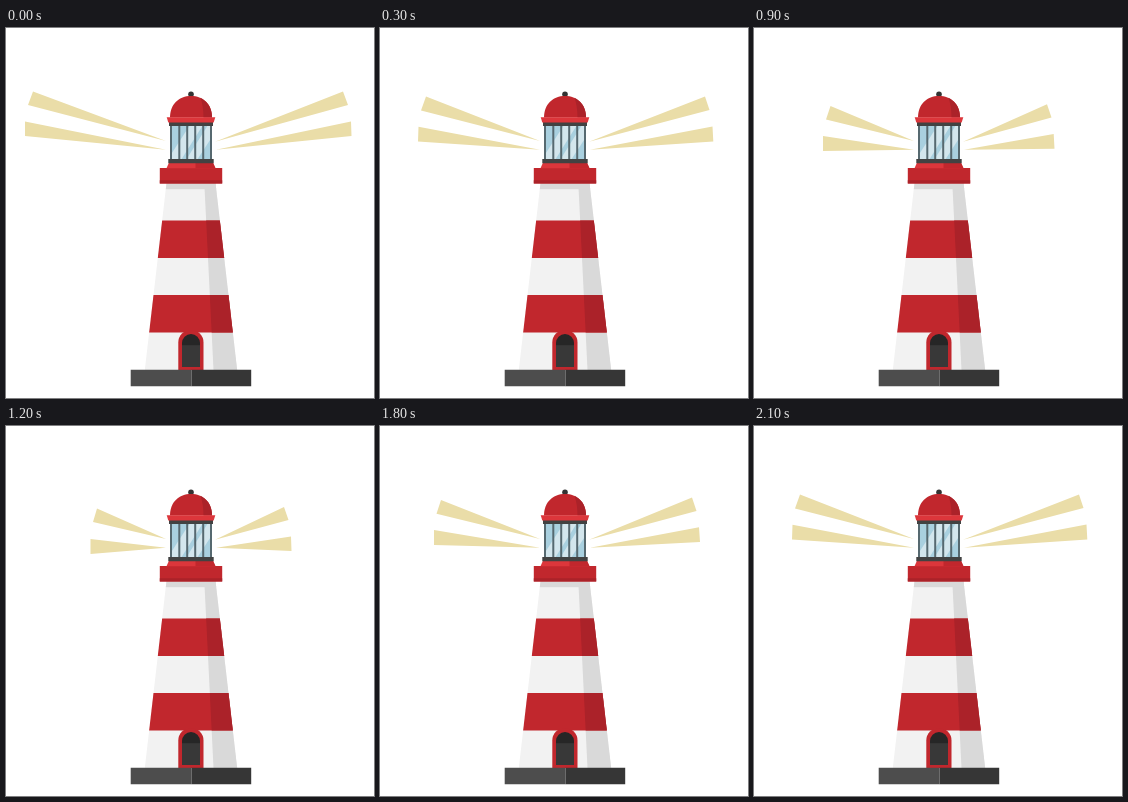
Write an HTML page that moves like this. It is 368x370 px and loops after 2.4 s.

```html
<!DOCTYPE html>
<html lang="en">
<head>
<meta charset="utf-8">
<title>Lighthouse</title>
<style>
  html, body { margin: 0; width: 100%; height: 100%; overflow: hidden; background: #fff; }
  svg { display: block; width: 368px; height: 370px; }

  .beams { fill: #eadda8; animation: sweep 2.4s step-end infinite; }

  /* Four wedges with fixed tips; the outer ends draw in and back out. */
  @keyframes sweep {
    0%, 100% { d: path("M160 113L27 63.5L22 77ZM160 121.7L19 93.5V108ZM209 113.7L337 63.5L342 77ZM210 121.7L345 93.5L345.5 108Z"); }
    12.5%, 87.5% { d: path("M160 113L46 68.5L41 82.5ZM160 121.7L38.5 98.7L38 113.5ZM209 113.7L325 68.5L329.5 82ZM210 121.7L332.5 98.5L333.3 113.5Z"); }
    25%, 75% { d: path("M160 113L61 74L56.5 87.7ZM160 121.7L54 104V119ZM209 113.7L312 71.5L316.5 85ZM210 121.7L319 101.3L320 116Z"); }
    37.5%, 62.5% { d: path("M160 113L76.5 78L72 91.5ZM160 121.7L69 108V123ZM209 113.7L293 76.3L297.5 89.5ZM210 121.7L299.7 106L300.5 120.7Z"); }
    50% { d: path("M160 113L91 82.5L87 96ZM160 121.7L84.5 113V128ZM209 113.7L278 81L282.5 94ZM210 121.7L285 110.5L285.5 125Z"); }
  }
</style>
</head>
<body>
<svg viewBox="0 0 368 370">
  <defs>
    <clipPath id="tower"><path d="M160.5 155H209.5L231.2 342H138.8Z"/></clipPath>
    <clipPath id="glass"><path d="M164 97H206V132H164Z"/></clipPath>
    <clipPath id="dome"><path d="M164 89.5C164 76 173 68 185 68S206 76 206 89.5Z"/></clipPath>
    <clipPath id="door"><path d="M176 339V315A9 9 0 0 1 194 315V339Z"/></clipPath>
    <path id="shade" d="M198.3 155H235V342H207.5Z"/>
    <path id="stripes" d="M130 192.5H240V230H130ZM130 267H240V304.5H130Z"/>
    <clipPath id="shaded"><use href="#shade"/></clipPath>
  </defs>

  <path class="beams" d="M160 113L27 63.5L22 77ZM160 121.7L19 93.5V108ZM209 113.7L337 63.5L342 77ZM210 121.7L345 93.5L345.5 108Z"/>

  <g clip-path="url(#tower)">
    <path fill="#f2f2f2" d="M130 155H240V342H130Z"/>
    <path fill="#d9d9d9" d="M130 155H240V161.3H130Z"/>
    <use href="#shade" fill="#d9d9d9"/>
    <use href="#stripes" fill="#c1272d"/>
    <use href="#stripes" fill="#ab2229" clip-path="url(#shaded)"/>
  </g>

  <path fill="#c1272d" d="M172.3 342V314.5A12.6 12.6 0 0 1 197.5 314.5V342Z"/>
  <g clip-path="url(#door)">
    <path fill="#262626" d="M175 304H195V318H175Z"/>
    <path fill="#383838" d="M175 317.3H195V339H175Z"/>
  </g>

  <path fill="#4d4d4d" d="M124.7 341.8H185.5V358.2H124.7Z"/>
  <path fill="#363636" d="M185.5 341.8H245.2V358.2H185.5Z"/>

  <path fill="#c1272d" d="M153.8 140H216.2V155.5H153.8Z"/>
  <path fill="#ab2229" d="M153.8 152.3H216.2V155.5H153.8Z"/>
  <path fill="#dc363b" d="M163 134.5H207L209.5 140.3H160.5Z"/>
  <path fill="#c1272d" d="M189.5 135H207L209.5 140.3H189.5Z"/>

  <g clip-path="url(#glass)">
    <path fill="#a9d0df" d="M164 97H206V132H164Z"/>
    <path fill="#d3e6ed" d="M184 97H197L175 132H164V128ZM202 97H206V109L191 132H180Z"/>
    <path stroke="#566970" stroke-width="2" d="M165 97V132M173.3 97V132M181.2 97V132M189.2 97V132M197.2 97V132M205 97V132"/>
  </g>
  <path fill="#424242" d="M163 93.5H207V98H163ZM162.3 131H207.7V135.3H162.3Z"/>

  <circle cx="185" cy="66.3" r="2.8" fill="#333"/>
  <g clip-path="url(#dome)">
    <path fill="#c1272d" d="M160 66H210V90H160Z"/>
    <path fill="#ab2229" d="M193 66Q197.5 76 197.5 90H210V66Z"/>
  </g>
  <path fill="#dc363b" d="M160.7 89.3H209.3L207.7 94.5H162.3Z"/>
</svg>
</body>
</html>
```
